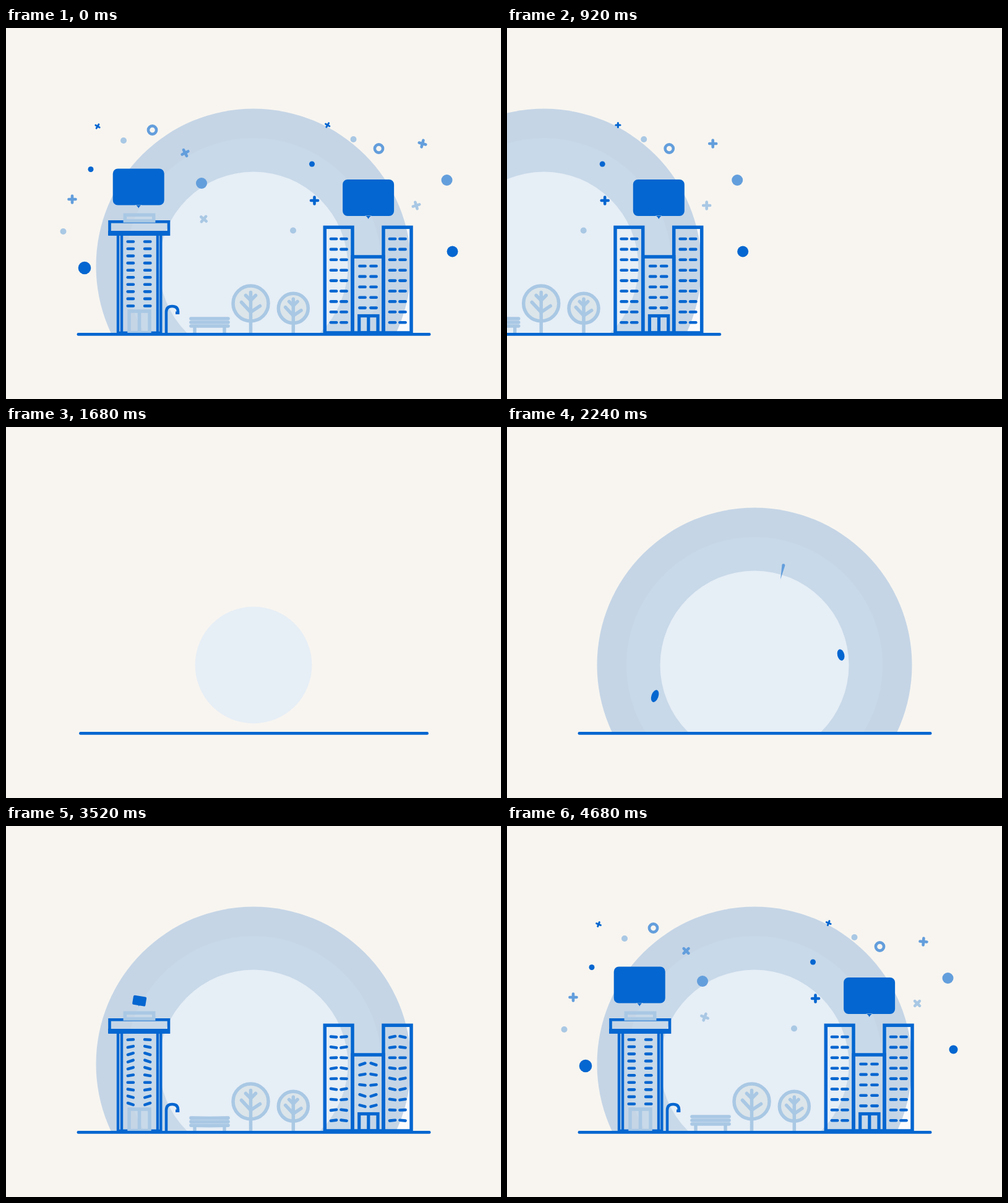
An HTML page with a canvas for the animation above (4720 ms loop, 800x600 px).

```html
<!DOCTYPE html>
<html lang="en">
<head>
<meta charset="utf-8">
<title>City scene</title>
<style>
html, body { margin: 0; width: 100%; height: 100%; overflow: hidden; background: #f8f5f0; }
canvas { display: block; width: 800px; height: 600px; }
</style>
</head>
<body>
<canvas id="stage" width="800" height="600"></canvas>
<script>
const LOOP = 4720, GROUND = 493;
const BLUE = '#0466d0', MID = '#639edc', PALE = '#a9c8e4';
const c = document.getElementById('stage').getContext('2d');

const clamp = v => Math.max(0, Math.min(1, v));
const span = (t, start, dur) => clamp((t - start) / dur);
const outQuad = u => 1 - (1 - u) ** 2;
const outCubic = u => 1 - (1 - u) ** 3;
const outBack = u => u <= 0 ? 0 : 1 + 2.4 * (u - 1) ** 3 + 1.4 * (u - 1) ** 2;
const bump = u => Math.sin(Math.PI * clamp(u));
const mix = (a, b, u) => a + (b - a) * u;

function pen(color, width, cap = 'round') {
  c.strokeStyle = c.fillStyle = color;
  c.lineWidth = width;
  c.lineCap = cap;
}
function line(...p) {
  c.beginPath();
  for (let i = 0; i < p.length; i += 2) c.lineTo(p[i], p[i + 1]);
  c.stroke();
}
function disc(x, y, r) {
  c.beginPath();
  c.arc(x, y, Math.max(0, r), 0, 7);
  c.fill();
}
function placed(x, y, rot, scale, draw) {
  c.save();
  c.translate(x, y);
  c.rotate(rot * Math.PI / 180);
  c.scale(scale, scale);
  draw();
  c.restore();
}
// Outline that grows from the middle of its base
function box(x0, x1, top, bottom, grow) {
  if (grow <= 0) return;
  const m = (x0 + x1) / 2, w = (x1 - x0) * grow;
  c.strokeRect(m - w / 2, mix(bottom, top, grow), w, (bottom - top) * grow);
}
function trim(path, length, from, to) {
  if (to <= from) return;
  c.setLineDash([(to - from) * length, 2000]);
  c.lineDashOffset = -from * length;
  c.stroke(path);
  c.setLineDash([]);
}

// Converging strokes: angle, radius, start, lag, width, bend
const RAYS = [
  [-90, 238, 1126, .284, 4.8, 0],
  [151, 200, 1033, .104, 5.5, 0],
  [-92, 200, 1048, .034, 5.5, 0],
  [90, 190, 1000, .06, 5.2, 0],
  [180, 349, 1000, .06, 5, 0],
  [20, 260, 990, .06, 5, 0],
  [-46.4, 180, 997, .25, 13.5, -.105],
  [214, 170, 954, .25, 13.5, .1]
];
// Converging bits: kind, angle, radius, arrival progress at 1320
const BITS = [['dot', 182.6, 350, .865], ['ring', -115.5, 240, .887], ['plus', 23.6, 220, .929]];

function converge(t) {
  for (const [a, R, start, lag, w, bend] of RAYS) {
    const u = (t - start) / 300;
    if (u <= 0 || u >= 1 + lag) continue;
    const head = R * (1 - clamp(u) ** 2), tail = R * (1 - clamp(u - lag) ** 2);
    const ox = w > 10 ? 403.5 : 400, oy = w > 10 ? 387.5 : 384;
    pen(BLUE, w);
    c.lineJoin = 'round';
    const pts = [];
    for (let i = 0; i <= 10; i++) {
      const r = mix(head, tail, i / 10);
      const ang = (a - bend * (r - 57)) * Math.PI / 180;
      pts.push(ox + r * Math.cos(ang), oy + r * Math.sin(ang));
    }
    line(...pts);
    c.lineJoin = 'miter';
  }
  for (const [kind, a, R, at] of BITS) {
    const u = at + (t - 1320) / 320;
    if (u <= .1 || u >= 1) continue;
    const r = R * (1 - u * u), ang = a * Math.PI / 180;
    placed(400 + r * Math.cos(ang), 384 + r * Math.sin(ang), 0, .64, () => shape(kind, MID, 9));
  }
}

function shape(kind, color, size) {
  if (kind === 'dot') {
    c.fillStyle = color;
    disc(0, 0, size);
  } else if (kind === 'ring') {
    pen(color, 4.6);
    c.beginPath();
    c.arc(0, 0, 6.6, 0, 7);
    c.stroke();
  } else {
    const k = size < 6 ? 3.6 : 5.5, w = size < 6 ? 3 : 4.6;
    pen(color, w);
    line(-k, 0, k, 0);
    line(0, -k, 0, k);
  }
}

// kind, color, x, y, size, pop time, spin left at loop start or pulse time
const CONFETTI = [
  ['plus', BLUE, 148, 159, 5, 3720, 60],
  ['plus', BLUE, 519.7, 157, 5, 3700, 60],
  ['plus', MID, 107, 277, 9, 3780, 0],
  ['plus', MID, 289.5, 202, 9, 3700, 118],
  ['plus', MID, 673, 187, 9, 3740, 75],
  ['plus', PALE, 319.5, 309, 9, 3760, 140],
  ['plus', PALE, 663, 287, 9, 3800, 198],
  ['plus', BLUE, 498.5, 279, 9, 3720, 0],
  ['dot', PALE, 190, 182, 5, 3760, 4800],
  ['dot', PALE, 92.5, 329, 5, 3920, 4920],
  ['dot', PALE, 561.5, 180, 5, 3740, 5000],
  ['dot', PALE, 464, 327.5, 5, 3800, 4860],
  ['dot', BLUE, 137, 228.5, 4.5, 3800, 4960],
  ['dot', BLUE, 494.5, 220, 4.5, 3760, 5040],
  ['dot', BLUE, 127, 388, 10.3, 3860, 4740],
  ['dot', BLUE, 721.5, 361.5, 9, 3840, 4560],
  ['dot', MID, 316, 251, 9, 3720, 5080],
  ['dot', MID, 712.5, 246, 9, 3780, 4900],
  ['ring', MID, 236.5, 165, 9, 3700, 4840],
  ['ring', MID, 602.5, 195, 9, 3720, 5020]
];

function confetti(t) {
  for (const [kind, color, x, y, size, start, extra] of CONFETTI) {
    const u = span(t, start, 400);
    if (!u) continue;
    const left = x < 400, e = outCubic(u), q = (t - LOOP) / 560;
    let rot = 0, scale = outBack(u);
    if (kind === 'plus') rot = -extra * (q < 0 ? 1 - 2 * q : (1 - clamp(q)) ** 2);
    else scale *= 1 - .32 * bump((t - extra) / 160);
    placed(mix(left ? 214 : 586, x, e), mix(left ? 258 : 275, y, e), rot, scale,
      () => shape(kind, color, size));
  }
}

function dome(t) {
  c.save();
  c.beginPath();
  c.rect(-900, 0, 2600, 495);
  c.clip();
  [['#c5d5e6', 254.5, 1720], ['#c8d9e9', 207, 1640], ['#e6eef6', 152.5, 1560]].forEach(([col, r, s]) => {
    c.fillStyle = col;
    disc(400, 385, r * outCubic(span(t, s, 440)));
  });
  c.restore();
}

// Mirrored rows of dashes, each growing inward and rocking until level
function windows(t, x0, x1, y, step, rows, start, delay, amp, freq, phase) {
  pen(BLUE, 4.6);
  const rock = amp * 70 * clamp(1 - (t - 2860) / 1040) ** 1.5;
  for (let i = 0; i < rows; i++) {
    const u = span(t, start + i * delay, 180);
    if (t < start) return;
    const half = 4.6 * outQuad(u);
    const a = rock * Math.sin(i * freq + phase + (t - 3520) / 130);
    placed(x0 - 4.6 + half, y + i * step, a, 1, () => line(-half, 0, half + .01, 0));
    placed(x1 + 4.6 - half, y + i * step, -a, 1, () => line(-half, 0, half + .01, 0));
  }
}

function lifted(dy, draw) {
  c.save();
  c.translate(0, dy);
  draw();
  c.restore();
}

const lampPath = new Path2D('M259 493V459.5Q259 450 268.5 450Q278 450 278 459');

function tower(t, hop) {
  const g = outBack(span(t, 2290, 340));
  if (g > 0) {
    lifted(-3 * hop, () => {
      pen(BLUE, 4.4, 'butt');
      box(181, 250.3, 333, GROUND, g);
      box(187, 245, 333, GROUND, g);
    });
    const r = outBack(span(t, 2440, 260)), k = outBack(span(t, 2560, 240));
    lifted(-9 * hop, () => {
      pen(BLUE, 4.6, 'butt');
      box(167.5, 263, 313.3, 333.5, r);
      c.fillRect(215 - 50 * r, 328, 100 * r, 7.5);
    });
    lifted(-16 * hop, () => box(192.3, 238.7, 302.3, 312, k));
    lifted(-4 * hop, () => box(199, 232, 458, GROUND, outBack(span(t, 2620, 220))));
    const d = span(t, 2960, 160);
    if (d) line(215.5, GROUND, 215.5, mix(GROUND, 458, d));
    lifted(-7 * hop, () => windows(t, 201.3, 228.7, 345.5, 11.55, 10, 2790, 42, 1.2, .5, -3));
  }
  pen(BLUE, 4.5, 'butt');
  const u = span(t, 2560, 320);
  trim(lampPath, 66, 0, u);
  if (u === 1) c.fillRect(274, 458.5, 6.3, 4.5);
}

function riser(t, x, start, dy) {
  const v = (t - start) / 200;
  if (v <= 0 || v >= 1.42) return;
  pen(BLUE, 5.5);
  line(x, mix(GROUND, 322 + dy, clamp(v)), x, mix(GROUND, 322 + dy, clamp(v - .42)));
}

function flats(t, hop) {
  const gA = outBack(span(t, 2340, 340)), gB = outBack(span(t, 2320, 320)), gC = outBack(span(t, 2380, 340));
  const rect = (...p) => { pen(BLUE, 5.5, 'butt'); box(...p); };
  lifted(-3.5 * hop, () => {
    rect(560, 610, 370, GROUND, gB);
    pen(BLUE, 5.2, 'butt');
    box(570.7, 601, 465.5, GROUND, outBack(span(t, 2600, 240)));
    windows(t, 576, 594, 385, 16.9, 5, 2900, 40, 1.2, .9, -1.44);
  });
  pen(BLUE, 5.2, 'butt');
  const d = span(t, 2960, 160);
  if (d) line(585.8, GROUND, 585.8, mix(GROUND, 465.5, d));
  lifted(-7 * hop, () => {
    rect(515.3, 560, 322.3, GROUND, gA);
    windows(t, 529.5, 546, 341, 16.9, 9, 2760, 10, .6, 1.4, -5.77);
  });
  lifted(-10 * hop, () => {
    rect(610, 655, 322.3, GROUND, gC);
    windows(t, 624.5, 641, 341, 16.9, 9, 2760, 14, .8, .6, -1.2);
  });
  riser(t, 538, 2796, 0);
  riser(t, 632.3, 2720, -6);
}

function bench(t) {
  const s = outBack(span(t, 2600, 220));
  if (s <= 0) return;
  const fall = span(t, 2640, 560) ** 2;
  const sag = 4 * Math.cos((t - 3520) / 70) * clamp(1 - (t - 3200) / 700) * (t > 3200);
  placed(329, mix(312, 476, fall), -14 * (1 - fall), s, () => {
    pen(PALE, 5.4, 'butt');
    line(-24, 8 + sag, -24, 17);
    line(24, 8 + sag, 24, 17);
    pen(PALE, 5.6);
    for (const y of [-6, 0, 6]) {
      c.beginPath();
      c.moveTo(-30, y + sag);
      c.quadraticCurveTo(0, y + sag * 1.4, 30, y + sag);
      c.stroke();
    }
  });
}

function tree(t, x, y, r, start) {
  const trunk = span(t, start, 180);
  if (!trunk) return;
  const crown = outBack(span(t, start + 130, 340)), b = span(t, start + 160, 260), k = r / 28.5;
  if (crown > 0) {
    c.fillStyle = '#dce5ea';
    disc(x, y, r * crown);
    pen(PALE, 5.5);
    c.beginPath();
    c.arc(x, y, r * crown, 0, 7);
    c.stroke();
  }
  pen(PALE, 5.5);
  line(x, GROUND, x, mix(GROUND, y - 18 * k, trunk));
  if (!b) return;
  for (const [dx, y0, y1] of [[-8, -5, -13], [8, -5, -13], [-15, 14, -2], [15, 14, 4]])
    line(x, y + y0 * k, x + dx * b * k, y + mix(y0, y1, b) * k);
}

const curve = (a, b, d, s) => a * (1 - s) ** 2 + 2 * b * s * (1 - s) + d * s * s;

function drops(t) {
  for (const [cx, cy, x, dur, tilt, rx, ry] of
    [[255, 352, 212, 213, 20, 5.6, 10.2], [551, 268, 585, 267, -14, 5.6, 9.4]]) {
    const s = (t - 2080) / dur;
    if (s <= 0 || s >= 1) continue;
    c.fillStyle = BLUE;
    placed(curve(400, cx, x, s), curve(385, cy, 494, s), tilt, Math.min(1, s * 4), () => {
      c.beginPath();
      c.ellipse(0, 0, rx, ry, 0, 0, 7);
      c.fill();
    });
  }
  const u = (t - 2160) / 80;
  if (u <= 0 || t > 2640) return;
  c.fillStyle = u > 2 ? PALE : MID;
  if (u <= 2) {
    const y = 224 + (u > 1 ? -11 * outQuad(u - 1) : 100 * (1 - u) ** 2);
    const x = 438 + 8.8 * Math.min(u, 1), len = 23 * Math.max(0, 1 - Math.max(0, u - 1));
    c.beginPath();
    c.arc(x, y, 2.5, 3, 6.6);
    c.lineTo(x - 4.8, y + len);
    c.fill();
  } else {
    const v = (t - 2320) / 320;
    disc(curve(446.8, 350, 329, v), curve(213, 200, 312, v), 2.5 + 3 * v);
  }
}

const arcs = [
  [new Path2D('M213.5 286C213.5 264 236 255 252 263C261 267 265 276 266 286'), 90, 2920],
  [new Path2D('M586 326V302C586 276 596 264 606 257C620 248 634 245 652 243'), 116, 2920]
];
function jets(t) {
  pen(BLUE, 4.8);
  for (const [path, len, at] of arcs) {
    const q = (t - at) / 200;
    if (q < -.7 || q > 1) continue;
    const left = len < 100;
    trim(path, len, clamp(q), clamp((left ? .66 : .65) + q));
    trim(path, len, clamp((left ? .94 : .83) + q), clamp((left ? .98 : .93) + q));
  }
}

function bubble(t, x, tip, start) {
  const u = span(t, start, 360);
  if (!u) return;
  placed(x, tip, 10 * (1 - u) ** 2, Math.max(.01, outBack(outQuad(u) * .8 + u * .2)), () => {
    c.fillStyle = BLUE;
    c.beginPath();
    c.roundRect(-41.5, -64, 83, 59, 8);
    c.moveTo(-5.5, -5.5);
    c.quadraticCurveTo(-2, -4.5, 0, 0);
    c.quadraticCurveTo(2, -4.5, 5.5, -5.5);
    c.fill();
  });
}

function scene(t) {
  const hop = bump((t - 2760) / 320);
  c.save();
  c.translate(-800 * span(t, LOOP + 560, 480) ** 3, 0);
  if (t > 2720) {
    c.fillStyle = '#fbfbfc';
    c.fillRect(610, 322 - 10 * hop, 45, 171);
  }
  dome(t);
  drops(t);
  bench(t);
  tree(t, 395.5, 445.5, 28.5, 2750);
  tree(t, 464.3, 453.3, 24, 2850);
  tower(t, hop);
  flats(t, hop);
  const half = 283.7 * outQuad(span(t, 1212, 528));
  if (half) {
    pen(BLUE, 4.6);
    line(400.5 - half - 1.6 * (half < 200), 495.4, 400.5 + half, 495.4);
  }
  jets(t);
  bubble(t, 214.2, 291.5, 3508);
  bubble(t, 585.6, 309, 3560);
  confetti(t);
  c.restore();
}

function draw(t) {
  c.fillStyle = '#f8f5f0';
  c.fillRect(0, 0, 800, 600);
  scene(t < 1040 ? t + LOOP : t);
  converge(t);
}

const begin = performance.now();
function tick() {
  draw((performance.now() - begin) % LOOP);
  requestAnimationFrame(tick);
}
tick();
</script>
</body>
</html>
```
